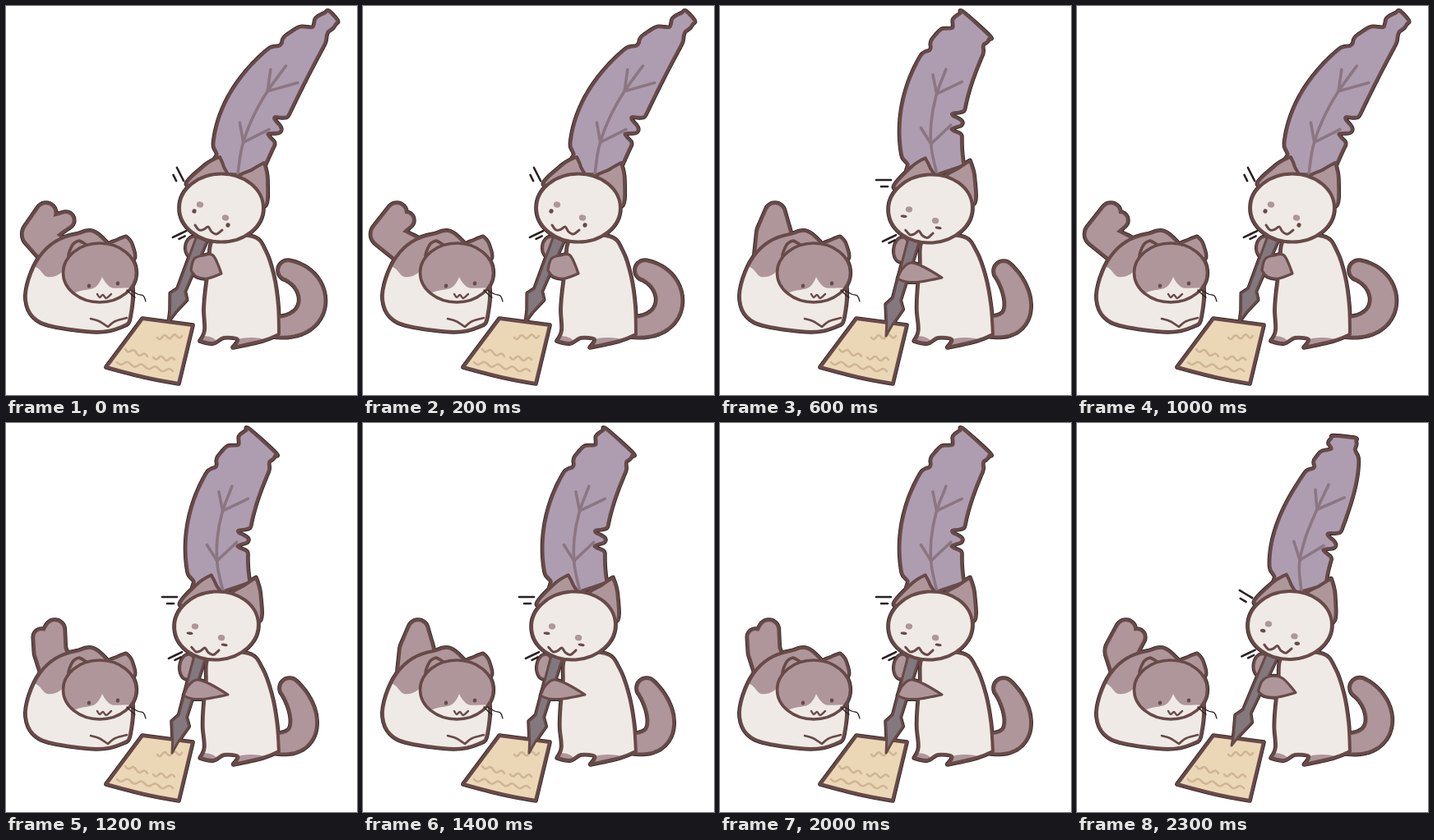
Animation, 427 px wide and 474 px high, one loop 2.4 s. Source, as an HTML page with a canvas:

```html
<!DOCTYPE html>
<html lang="en">
<head>
<meta charset="utf-8">
<title>Two cats and a quill</title>
<style>
html, body { margin: 0; width: 100%; height: 100%; overflow: hidden; background: #fff; }
canvas { display: block; width: 427px; height: 474px; }
</style>
</head>
<body>
<canvas id="stage"></canvas>
<script>
const W = 427, H = 474, STEP = 100, DRAWINGS = 8, TAU = Math.PI * 2;
const LINE = '#684a49', FUR = '#ae969b', CREAM = '#efeae5', PLUME = '#ae9db1',
  VEIN = '#8b7682', PEN = '#82787e', PAPER = '#ebd7b6', INK = '#cfb596', DARK = '#2b2022';

const canvas = document.getElementById('stage');
const ctx = canvas.getContext('2d');
const dpr = window.devicePixelRatio || 1;
canvas.width = W * dpr;
canvas.height = H * dpr;

let edge = false; // true while the dark rim behind everything is drawn

// "x,y" is a smooth point, "x,y!" a corner
const pts = s => s.split(' ').map(p => {
  const [x, y] = p.replace('!', '').split(',').map(Number);
  return { x, y, hard: p.endsWith('!') };
});
const lerp = (a, b, t) => a + (b - a) * t;
const between = (a, b, t) => ({ x: lerp(a.x, b.x, t), y: lerp(a.y, b.y, t), hard: a.hard });
const mix = (a, b, t) => a.map((p, i) => between(p, b[i], t));

// Point on a Bezier curve of any degree
function bezier(p, t) {
  while (p.length > 1) p = p.slice(1).map((q, i) => between(p[i], q, t));
  return p[0];
}

// Point beside a spine, to its right when side is positive
function beside(spine, t, side) {
  const p = bezier(spine, t), a = bezier(spine, t - .01), b = bezier(spine, t + .01);
  const len = Math.hypot(b.x - a.x, b.y - a.y);
  return { x: p.x - (b.y - a.y) / len * side, y: p.y + (b.x - a.x) / len * side };
}

function curve(p, closed = true) {
  const path = new Path2D(), n = p.length;
  const at = i => closed ? p[(i + n) % n] : p[Math.max(0, Math.min(n - 1, i))];
  const handle = (i, sign) => {
    const c = at(i), a = at(i - 1), b = at(i + 1), k = c.hard ? 0 : sign / 6;
    return [c.x + (b.x - a.x) * k, c.y + (b.y - a.y) * k];
  };
  path.moveTo(p[0].x, p[0].y);
  for (let i = 0; i < (closed ? n : n - 1); i++) {
    const end = at(i + 1);
    path.bezierCurveTo(...handle(i, 1), ...handle(i + 1, -1), end.x, end.y);
  }
  if (closed) path.closePath();
  return path;
}

function oval(x, y, rx, ry, turn = 0) {
  const path = new Path2D();
  path.ellipse(x, y, rx, ry, turn, 0, TAU);
  return path;
}

function stroke(path, color, width) {
  ctx.strokeStyle = color;
  ctx.lineWidth = width;
  ctx.stroke(path);
}

function fill(path, color) {
  ctx.fillStyle = color;
  ctx.fill(path);
}

function shape(path, color, width = 4, patches = [], patchColor = FUR) {
  if (edge) return stroke(path, DARK, width + 1.6);
  fill(path, color);
  ctx.save();
  ctx.clip(path);
  patches.forEach(p => fill(p, patchColor));
  ctx.restore();
  stroke(path, LINE, width);
}

function detail(p, color, width) {
  if (!edge) stroke(curve(p, false), color, width);
}

function dot(x, y, rx, ry, color) {
  if (!edge) fill(oval(x, y, rx, ry, .2), color);
}

// Discs along a spine, merged into one outlined body
function trail(path, spine, radius) {
  for (let i = 0; i <= 40; i++) {
    const p = bezier(spine, i / 40), r = radius(i / 40);
    path.moveTo(p.x + r, p.y);
    path.arc(p.x, p.y, r, 0, TAU);
  }
  return path;
}

function merged(path, color, width = 4) {
  if (edge) return stroke(path, DARK, width * 2 + 1.6);
  stroke(path, LINE, width * 2);
  fill(path, color);
}

function scribble(x0, y0, x1, y1, waves) {
  const p = [];
  for (let i = 0; i <= 40; i++) {
    const t = i / 40;
    p.push({ x: lerp(x0, x1, t), y: lerp(y0, y1, t) + 2.2 * Math.sin(t * waves * TAU) });
  }
  detail(p, INK, 2.6);
}

function drawSheet() {
  shape(curve(pts('166,381! 227,389! 210,460! 168,452 122,440!')), PAPER);
  scribble(184, 404, 214, 402, 2.5);
  scribble(145, 418, 172, 427, 2);
  scribble(179, 428, 205, 431, 2);
  scribble(135, 434, 203, 445, 4);
}

function drawLoafTail(angle) {
  const sway = -Math.cos(angle), lag = Math.sin(angle);
  const mid = { x: 45 + 22 * sway, y: 278 };
  const tip = { x: 54 + 14 * sway, y: 252 };
  const tuft = { x: 58 - 16 * lag, y: 261 };
  const path = new Path2D(), thick = 16 + 3 * sway;
  trail(path, [{ x: 62, y: 302 }, mid], t => lerp(18, thick, t));
  trail(path, [mid, tip], t => lerp(thick, 10, t));
  trail(path, [mid, tuft], t => lerp(thick, 8, t));
  merged(path, FUR);
}

function drawLoaf() {
  const back = curve(pts('20,312! 38,319 50,330 66,326 78,310! 130,300! 120,260! 50,260!'));
  const muzzle = curve(pts('117,330! 108,343 82,351 76,375! 156,375! 155,346 128,343'));
  shape(curve(pts('112,278 85,278 60,287 41,305 28,332 24,358 33,379 56,390 110,397 140,391 151,379 151,330')),
    CREAM, 4, [back]);
  shape(curve(pts('77,306 81,291 89,286! 100,295')), FUR, 3.6);
  shape(curve(pts('126,292 136,285 146,281! 153,290 155,308')), FUR, 3.6);
  shape(oval(114, 325, 44.5, 36), FUR, 3.6, [muzzle], CREAM);
  dot(101, 341, 2.2, 2.6, LINE);
  dot(136, 338, 2.2, 2.6, LINE);
  detail(pts('111,351 114,355 118,352 122,356 128,351'), LINE, 2.4);
  detail(pts('103,381 113,384 124,391! 133,384 147,380'), LINE, 2.6);
  detail(pts('147,346 153,352 157,355'), DARK, 1.3);
  detail(pts('151,346 160,351 167,353 170,360'), DARK, 1.3);
}

function drawFeather(u, drag) {
  const spine = mix(pts('282,205 285,140 330,75 398,12'), pts('264,205 244,145 264,75 312,22'), u);
  [0, 9, -22, 30].forEach((push, i) => spine[i].x += push * drag);

  const full = lerp(.85, .3, u);
  const dip = (t, at, depth) => depth * Math.exp(-(((t - at) / .025) ** 2));
  const half = t => 38 * Math.sin(Math.PI * (.25 + .7 * t)) ** full;
  const left = t => -half(t) + dip(t, .74, 6) + dip(t, .9, 9) + dip(t, .1, 5);
  const right = t => half(t) - dip(t, .41, 15) - dip(t, .3, 13) - dip(t, .93, 4);

  const rim = [], N = 60;
  for (let i = 0; i <= N; i++) rim.push(beside(spine, i / N, left(i / N)));
  for (let i = N; i >= 0; i--) rim.push(beside(spine, i / N, right(i / N)));
  shape(curve(rim), PLUME);

  detail([0, .17, .34, .51, .68].map(t => bezier(spine, t)), VEIN, 3.6);
  for (const t of [.2, .52]) {
    detail([beside(spine, t + .1, -12), bezier(spine, t), beside(spine, t + .13, 24)]
      .map(p => ({ ...p, hard: true })), VEIN, 3.6);
  }
}

function drawPen(u, drag) {
  const shaft = [{ x: 238 - 2 * u, y: 284 }, { x: 198 + 4 * u + 12 * drag, y: 384 + 18 * u }];
  const profile = [[0, 7], [.62, 5], [.7, 11], [.88, 3.5], [1, 0]];
  const side = s => profile.map(([t, w]) => ({ ...beside(shaft, t, w * s), hard: true }));
  shape(curve([...side(1), ...side(-1).reverse()]), PEN, 3);
}

function drawHead(u) {
  ctx.save();
  ctx.translate(262 - 6 * u, 246 + u);
  ctx.rotate(-.07 * u);
  shape(curve(pts('-42,-28 -20,-52 -2,-62! 3,-50 6,-34')), FUR);
  shape(curve(pts('20,-34 38,-47 52,-55! 56,-34 52,-2')), FUR);
  shape(oval(0, 0, 51, 41.5), CREAM);

  ctx.translate(0, 3 * u);
  dot(-26, -4, 4.2, 3.6, FUR);
  dot(5, 12, 4.2, 3.6, FUR);
  dot(-33, 4, 2.6 + 1.4 * u, 2.7 - u, LINE);
  dot(8, 21, 2.6 + 1.4 * u, 2.7 - u, LINE);
  detail(pts('-32,21 -27,27 -21,26 -16,23 -12,29 -6,32 1,27'), LINE, 3);
  ctx.restore();
}

// A long and a short dash side by side
function drawMark(x, y, turn, gap) {
  ctx.save();
  ctx.translate(x, y);
  ctx.rotate(turn);
  detail(pts('-9,0 9,0'), DARK, 2.6);
  ctx.translate(0, gap);
  detail(pts('-3,0 5,0'), DARK, 2.6);
  ctx.restore();
}

function drawWriter(u, drag) {
  drawFeather(u, drag);

  const tail = mix(pts('325,391 385,395 385,335 343,322'), pts('325,390 374,396 368,350 345,323'), u);
  merged(trail(new Path2D(), tail, t => 10 + 4 * Math.sin(Math.PI * t)), FUR);

  // The body leans from its feet
  ctx.save();
  const lean = .042 * u;
  ctx.transform(1, 0, lean, 1, -402 * lean, 0);
  shape(curve(pts('254,283 300,281 316,299 326,330 331,365 332,400! 312,408 276,416! 282,406 265,404 252,411 236,408! 242,395 241,370 243,345 247,318')),
    CREAM, 4, [oval(241, 411, 16, 9), oval(298, 414, 27, 10)]);
  ctx.restore();

  shape(oval(228 - 7 * u, 294 + 3 * u, 9.5, 13 + 2 * u, .1), FUR, 3.2);
  drawPen(u, drag);
  shape(curve(mix(pts('225,322! 229,308 240,304 252,304 262,326! 245,332 232,330'),
    pts('216,332! 222,320 232,313 248,318 270,331! 244,336 226,336'), u)), FUR, 3.2);
  drawHead(u);
  drawMark(lerp(212, 199, u), lerp(205, 212, u), lerp(1.1, 0, u), 8);
  drawMark(lerp(211, 206, u), lerp(278, 283, u), -.45, 5);
}

function draw(time) {
  const beat = Math.floor(time / STEP) % DRAWINGS;
  const angle = lag => TAU * (beat - lag) / DRAWINGS;
  // Swing that rests at both ends; the quill trails behind in between
  const u = Math.max(0, Math.min(1, .5 - Math.SQRT1_2 * Math.cos(angle(1))));
  const drag = 4 * u * (1 - u) * Math.sin(angle(1));

  ctx.setTransform(dpr, 0, 0, dpr, 0, 0);
  ctx.lineCap = ctx.lineJoin = 'round';
  ctx.fillStyle = '#fff';
  ctx.fillRect(0, 0, W, H);
  for (edge of [true, false]) {
    drawSheet();
    drawLoafTail(angle(1.5));
    drawLoaf();
    drawWriter(u, drag);
  }
}

function tick() {
  draw(performance.now());
  requestAnimationFrame(tick);
}
tick();
</script>
</body>
</html>
```
